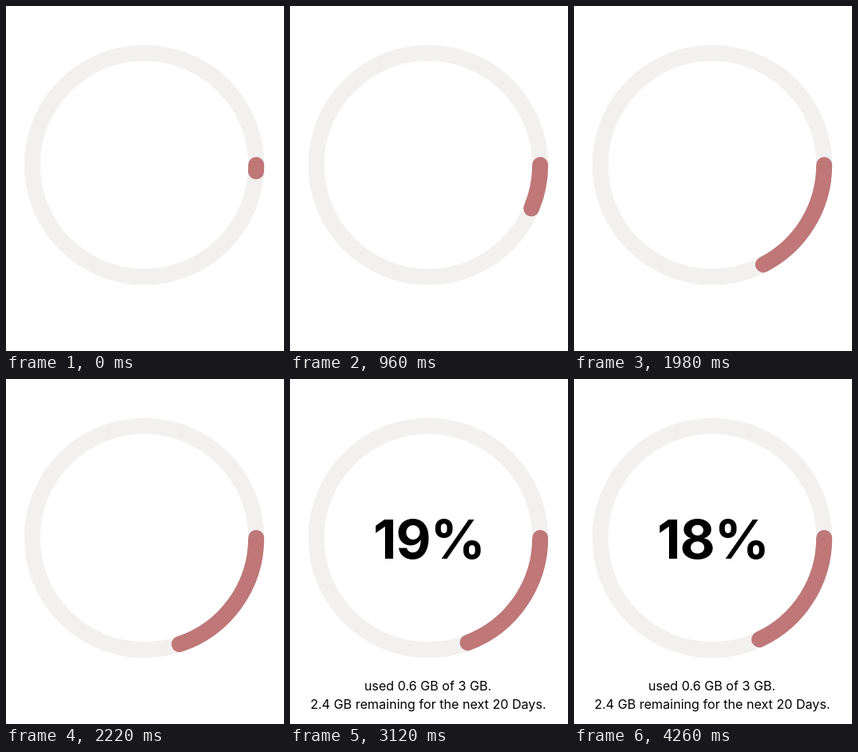
Recreate the animation shown at these times as an HTML page. Size 348 by 432 pixels, loop 4.32 s.

```html
<!DOCTYPE html>
<html lang="en">
<head>
<meta charset="utf-8">
<title>Data usage ring</title>
<style>
  html, body { margin: 0; width: 100%; height: 100%; overflow: hidden; background: #fff; }
  svg { display: block; width: 100vw; height: 100vh; }
  circle, path { fill: none; stroke-width: 20; stroke-linecap: round; }
  circle { stroke: #f3f0f0; }
  path { stroke: #bf7778; }
  text { font: 400 16.13px Inter, "Liberation Sans", sans-serif; text-anchor: middle; fill: #000; }
  #percent { font-size: 68px; font-weight: 700; letter-spacing: -1px; font-kerning: none; }
</style>
</head>
<body>
<svg viewBox="0 0 348 432">
  <circle cx="173" cy="199" r="140.2"/>
  <path id="arc"/>
  <g id="labels" visibility="hidden">
    <text id="percent" x="174" y="224.5">20%</text>
    <text x="172.5" y="390">used 0.6 GB of 3 GB.</text>
    <text x="173" y="412.5">2.4 GB remaining for the next 20 Days.</text>
  </g>
</svg>
<script>
  const LOOP = 4320, STEP = 60, LABELS_AT = 2460;
  const CX = 173, CY = 199, R = 140.2;

  // Sweep in degrees over time: slow start, overshoot, settle at 18%.
  const keys = [
    [0, 3.3], [540, 11.5], [1320, 34.3], [1620, 47.4], [1980, 62.9],
    [2160, 70.3], [2400, 73.8], [2700, 72.6], [3120, 69.3],
    [3240, 68.3], [3600, 66.4], [3960, 65.1], [LOOP, 65.1]
  ];

  const slope = i => {
    const a = keys[Math.max(i - 1, 0)], b = keys[Math.min(i + 1, keys.length - 1)];
    return (b[1] - a[1]) / (b[0] - a[0]);
  };

  function sweepAt(t) {
    let i = 0;
    while (i < keys.length - 2 && t >= keys[i + 1][0]) i++;
    const [t0, a] = keys[i], [t1, b] = keys[i + 1];
    const d = t1 - t0, u = (t - t0) / d, v = 1 - u;
    return a * v * v * (1 + 2 * u) + b * u * u * (3 - 2 * u)
      + d * u * v * (slope(i) * v - slope(i + 1) * u);
  }

  const arc = document.getElementById('arc');
  const labels = document.getElementById('labels');
  const percent = document.getElementById('percent');

  function draw(t) {
    const deg = sweepAt(t), rad = deg * Math.PI / 180;
    const x = CX + R * Math.cos(rad), y = CY + R * Math.sin(rad);
    arc.setAttribute('d', `M${CX + R} ${CY}A${R} ${R} 0 0 1 ${x} ${y}`);
    labels.setAttribute('visibility', t >= LABELS_AT ? 'visible' : 'hidden');
    percent.textContent = Math.floor(deg / 3.6) + '%';
  }

  let start;
  function tick(now) {
    start ??= now;
    const t = (now - start) % LOOP;
    draw(Math.floor(t / STEP) * STEP);
    requestAnimationFrame(tick);
  }
  draw(0);
  requestAnimationFrame(tick);
</script>
</body>
</html>
```
